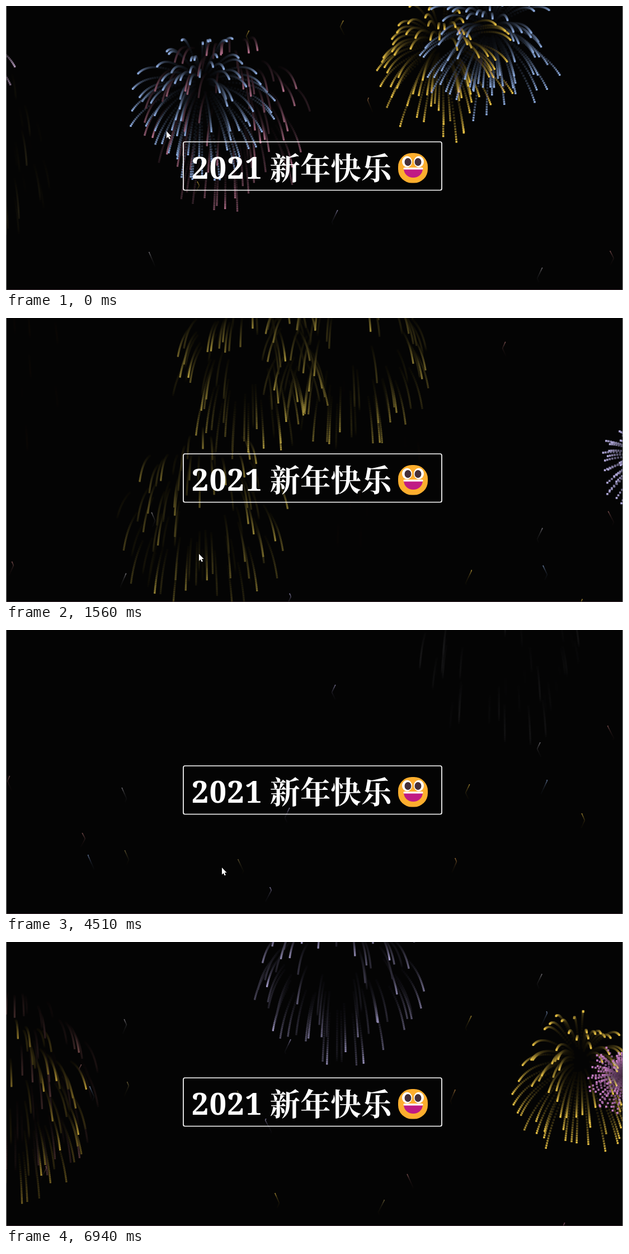
Recreate the animation shown at these times as an HTML page with a canvas. Size 1103x508 px, loop 7.04 s.

```html
<!DOCTYPE html>
<html lang="zh">
<head>
<meta charset="utf-8">
<title>2021 新年快乐</title>
<style>
html, body { margin: 0; width: 100%; height: 100%; overflow: hidden; background: #040404; }
canvas { display: block; width: 100%; height: 100%; }
</style>
</head>
<body>
<canvas id="stage" width="1103" height="508"></canvas>
<script>
const ctx = document.getElementById('stage').getContext('2d');
const W = 1103, H = 508, LOOP = 7040, STEP = 120;
const TICK = 1 / 48;

// The picture advances every 120 ms, with a slightly longer hold before each start.
const STARTS = [0, 1700, 3640, 4390, 5260, LOOP];

const COLORS = {
  blue: [138, 168, 218], pink: [186, 116, 144], gold: [226, 188, 66], lemon: [216, 190, 76],
  brown: [192, 134, 80], lilac: [172, 164, 212], mauve: [188, 160, 196], olive: [140, 124, 70],
  orange: [206, 146, 72], grey: [158, 156, 164], rose: [178, 104, 150], green: [116, 184, 108],
  rust: [164, 104, 104], orchid: [192, 120, 188]
};

// x, y, time of the burst in seconds, colour
const BURSTS = [
  [350, 138, -0.56, 'blue'], [397, 139, -0.85, 'pink'], [780, 69, -0.57, 'gold'],
  [866, 42, -0.53, 'blue'], [-125, 52, -0.65, 'mauve'], [-70, 180, -1.2, 'olive'],
  [650, 147, 0.12, 'brown'], [-40, -4, 0.14, 'brown'], [435, 6, 0.62, 'lemon'],
  [605, -7, 0.58, 'lemon'], [352, 284, 0.57, 'lemon'], [1150, 250, 1.29, 'lilac'],
  [-115, 200, 2.2, 'orange'], [257, 284, 2.76, 'lilac'], [880, -60, 3.25, 'grey'],
  [1150, 162, 5.08, 'green'], [1082, 128, 5.31, 'rose'], [15, 182, 5.93, 'rust'],
  [0, 225, 6, 'gold'], [595, -10, 6.06, 'lilac'], [1027, 214, 6.38, 'gold'],
  [1102, 240, 6.78, 'orchid']
];

// x, height at time zero, colour, time of bursting (if any)
const ROCKETS = [
  [435, 44, 'gold', 0.62], [603, 26, 'gold', 0.58], [652, 164, 'brown', 0.12],
  [340, 314, 'gold', 0.57], [893, 135, 'rust', 3.25], [588, 365, 'lilac', 6.05],
  [955, 468, 'grey'], [1081, 438, 'rust', 5.31], [261, 440, 'grey', 2.75],
  [210, 549, 'grey'], [8, 528, 'rust', 5.93], [962, 535, 'blue'], [827, 543, 'gold'],
  [504, 585, 'lilac'], [1029, 595, 'gold', 6.38], [136, 630, 'rust'], [152, 669, 'blue'],
  [214, 661, 'olive'], [419, 677, 'olive'], [800, 675, 'orange'], [469, 727, 'lilac'],
  [67, 812, 'rust'], [722, 826, 'rust'], [483, 860, 'gold'], [671, 872, 'olive'],
  [996, 913, 'pink']
];

// time in seconds, x, y
const POINTER = [
  [0, 287, 224], [0.84, 391, 437], [1.56, 345, 422], [2.9, 382, 427],
  [4.51, 386, 425], [5.5, 725, 422], [6.4, 800, 520], [7.04, 800, 520]
];

function random(seed) {
  return () => {
    seed = (seed + 0x6D2B79F5) | 0;
    let n = Math.imul(seed ^ (seed >>> 15), 1 | seed);
    n = (n + Math.imul(n ^ (n >>> 7), 61 | n)) ^ n;
    return ((n ^ (n >>> 14)) >>> 0) / 4294967296;
  };
}

const SPARKS = 82;

const bursts = BURSTS.map(([x, y, born, color], i) => {
  const rnd = random(31 + i * 97);
  const sparks = Array.from({ length: SPARKS }, (_, n) => {
    const angle = (n + rnd() * 1.5) / SPARKS * Math.PI * 2;
    const reach = 166 * Math.sqrt(0.08 + 0.92 * rnd());
    return { dx: Math.cos(angle) * reach, dy: Math.sin(angle) * reach, life: 0.88 + rnd() * 0.42 };
  });
  return { x, y, born, rgb: COLORS[color], sparks };
});

const rockets = ROCKETS.map(([x, y, color, end = 99], i) => {
  const rnd = random(500 + i * 53);
  return { x, y, end, rgb: COLORS[color], period: 0.7 + rnd() * 0.2, phase: rnd() };
});

const clamp = v => Math.max(0, Math.min(1, v));
const shade = (rgb, level) => `rgb(${rgb.map(c => Math.round(c * level)).join()})`;

function snap(ms) {
  let i = 0;
  while (ms >= STARTS[i + 1]) i++;
  const last = Math.round((STARTS[i + 1] - STARTS[i]) / STEP) - 1;
  return STARTS[i] + STEP * Math.min(last, Math.floor((ms - STARTS[i]) / STEP));
}

// Sparks slow down by drag while gravity pulls them under; each one fades in its own time.
function drawBurst({ x, y, born, rgb, sparks }, t) {
  const drag = 3, gravity = 440;
  if (t < born || t > born + 1.8) return;
  for (let k = 22; k >= 0; k--) {
    const age = t - born - k * TICK;
    if (age < 0) continue;
    const spread = 1 - Math.exp(-drag * age);
    const fall = gravity / drag * (age - spread / drag);
    const size = 3.8 - age * 0.6;
    const trail = Math.exp(-k / 7);
    for (const { dx, dy, life } of sparks) {
      const level = clamp((life - age) / 0.45) * trail;
      if (level < 0.02) continue;
      ctx.fillStyle = shade(rgb, level);
      ctx.fillRect(x + dx * spread - size / 2, y + dy * spread + fall - size / 2, size, size);
    }
  }
}

function rocketAt(r, t) {
  const p = ((t / r.period + r.phase) % 1 + 1) % 1;
  return [r.x + (Math.abs(p * 2 - 1) - 0.5) * 11, r.y - 59.2 * t];
}

function drawRocket(r, t) {
  if (t > r.end + 0.4) return;
  ctx.lineWidth = 1.6;
  for (let k = 20; k >= 0; k--) {
    const at = t - k * TICK;
    if (at > r.end) continue;
    ctx.strokeStyle = shade(r.rgb, 0.75 * Math.exp(-k / 7));
    ctx.beginPath();
    ctx.moveTo(...rocketAt(r, at));
    ctx.lineTo(...rocketAt(r, at - TICK));
    ctx.stroke();
  }
}

function ellipse(x, y, rx, ry, color) {
  ctx.fillStyle = color;
  ctx.beginPath();
  ctx.ellipse(x, y, rx, ry, 0, 0, Math.PI * 2);
  ctx.fill();
}

function drawFace() {
  ctx.fillStyle = '#fdae2e';
  ctx.beginPath();
  ctx.roundRect(701, 263, 53, 53.5, 24.5);
  ctx.fill();
  for (const [eye, pupil] of [[717, 718.5], [738, 736.5]]) {
    ellipse(eye, 278.5, 9, 10, '#fff');
    ellipse(pupil, 279, 6, 7, '#45303a');
  }
  ctx.fillStyle = '#c01b84';
  ctx.beginPath();
  ctx.moveTo(711, 289);
  ctx.lineTo(745, 289);
  ctx.bezierCurveTo(746, 313, 710, 313, 711, 289);
  ctx.fill();
  ctx.fillStyle = '#fff';
  ctx.beginPath();
  ctx.roundRect(710.5, 289, 35, 3.5, 1.5);
  ctx.fill();
}

function drawTitle() {
  ctx.strokeStyle = '#fff';
  ctx.lineWidth = 1.7;
  ctx.beginPath();
  ctx.roundRect(317, 243, 462, 86.5, 3);
  ctx.stroke();
  ctx.fillStyle = '#fff';
  ctx.letterSpacing = '1.6px';
  ctx.font = '700 54px "Noto Serif", serif';
  ctx.fillText('2021', 332, 309);
  ctx.letterSpacing = '0px';
  ctx.font = '700 54.4px "Noto Serif CJK SC", "Noto Sans CJK SC", "Noto Sans CJK", serif';
  ctx.fillText('新年快乐', 471.5, 309.5);
  drawFace();
}

function drawPointer(t) {
  let i = 0;
  while (i < POINTER.length - 2 && t >= POINTER[i + 1][0]) i++;
  const [a, ax, ay] = POINTER[i], [b, bx, by] = POINTER[i + 1];
  const u = clamp((t - a) / (b - a)), e = u * u * (3 - 2 * u);
  ctx.save();
  ctx.translate(ax + (bx - ax) * e, ay + (by - ay) * e);
  ctx.fillStyle = '#fff';
  ctx.fill(new Path2D('M0 0V12.5L2.8 9.9L4.8 14.2L6.8 13.3L4.9 9.1H8.6Z'));
  ctx.restore();
}

function drawEdges() {
  ctx.fillStyle = '#3a2a30';
  ctx.fillRect(0, H - 1, W, 1);
  ctx.fillStyle = '#8c8c8c';
  ctx.fillRect(0, 0, 1, H);
  ctx.fillRect(W - 1, 0, 1, H);
}

function draw(t) {
  ctx.fillStyle = '#040404';
  ctx.fillRect(0, 0, W, H);
  ctx.globalCompositeOperation = 'lighten';
  bursts.forEach(b => drawBurst(b, t));
  rockets.forEach(r => drawRocket(r, t));
  ctx.globalCompositeOperation = 'source-over';
  drawTitle();
  drawPointer(t);
  drawEdges();
}

const begin = performance.now();
let shown = -1;

function tick() {
  const now = snap((performance.now() - begin) % LOOP);
  if (now !== shown) {
    shown = now;
    draw(now / 1000);
  }
  requestAnimationFrame(tick);
}
tick();
</script>
</body>
</html>
```
